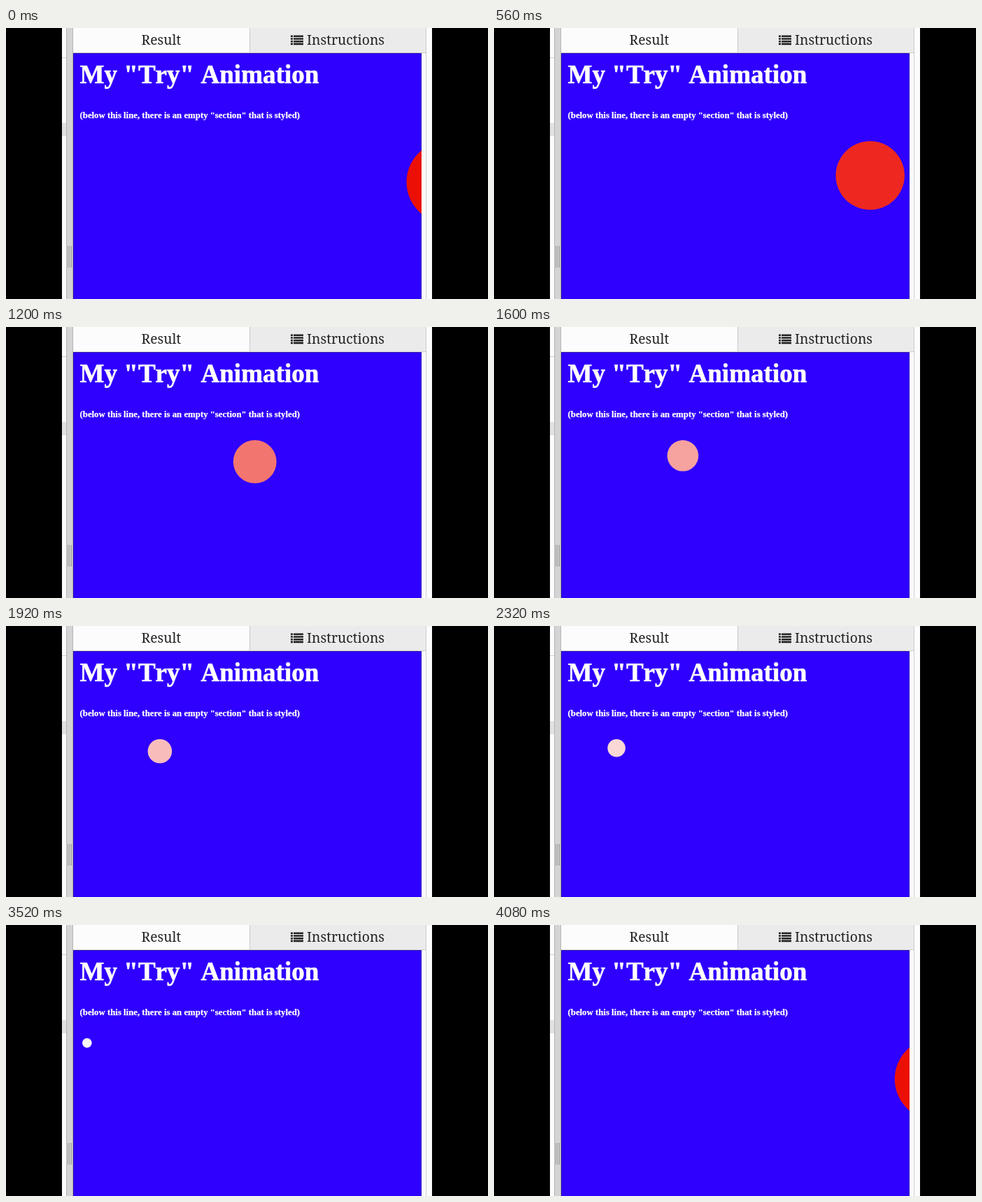
Write an HTML page that moves like this. It is 689x388 px and loops after 4120 ms.

```html
<!DOCTYPE html>
<html lang="en">
<head>
<meta charset="utf-8">
<title>Try animation</title>
<style>
  html, body { margin: 0; width: 100%; height: 100%; overflow: hidden; background: #000; }
  svg { display: block; width: 689px; height: 388px; }
  text { font-kerning: none; }
  .tab { font: 19.3px "Noto Serif", serif; fill: #222; }
  .page {
    font-family: "Liberation Serif", "Times New Roman", serif;
    font-weight: bold; fill: #fff; stroke: #fff;
  }
</style>
</head>
<body>
<svg viewBox="0 0 689 388">
  <defs>
    <clipPath id="view"><rect x="97" y="37" width="497" height="351"/></clipPath>
  </defs>

  <!-- window chrome -->
  <rect x="80" width="529" height="388" fill="#fcfcfc"/>
  <rect x="80" y="42" width="6" height="1" fill="#ccc"/>
  <rect x="80" y="136" width="6" height="19" fill="#e2e2e2"/>
  <rect x="86" width="10" height="388" fill="#d4d4d4"/>
  <path d="M86.5 0V388M95.5 0V388" stroke="#b4b4b4"/>
  <path d="M88.5 312V343M91 312V343M93.5 312V343" stroke="#999"/>

  <!-- tabs -->
  <rect x="348" width="252" height="35" fill="#ebebeb"/>
  <path d="M348.5 0V35M600.5 0V388M96 35.5H600" stroke="#ccc"/>
  <path d="M407 11.8h3m1 0h14M407 15.5h3m1 0h14M407 19.2h3m1 0h14M407 22.9h3m1 0h14" stroke="#222" stroke-width="2.6"/>
  <text class="tab" x="193.5" y="24">Result</text>
  <text class="tab" x="430" y="24">Instructions</text>

  <!-- page -->
  <rect x="96.5" y="36.5" width="497" height="360" fill="#2f00fe" stroke="#2404b8"/>
  <text class="page" x="105.5" y="79" font-size="37.1" stroke-width=".6">My "Try" Animation</text>
  <text class="page" x="105.5" y="129" font-size="12.8" stroke-width=".25">(below this line, there is an empty "section" that is styled)</text>
  <g clip-path="url(#view)"><circle id="ball"/></g>
</svg>
<script>
  const LOOP = 4120, STEP = 40, DURATION = 3970, LEAD = 30, RESTART = 4055;
  const ball = document.getElementById("ball");
  const mix = (a, b, p) => a + (b - a) * p;
  const bezier = (a, b, s) => 3 * (1 - s) ** 2 * s * a + 3 * (1 - s) * s * s * b + s ** 3;

  // cubic-bezier(.25, .1, .25, 1), solved by bisection
  function ease(x) {
    let lo = 0, hi = 1;
    for (let i = 0; i < 30; i++) {
      const mid = (lo + hi) / 2;
      if (bezier(.25, .25, mid) < x) lo = mid; else hi = mid;
    }
    return bezier(.1, 1, lo);
  }

  function draw(now) {
    const t = Math.floor(now % LOOP / STEP) * STEP;
    const elapsed = t < RESTART ? Math.min(t + LEAD, DURATION) : t - RESTART;
    const p = ease(elapsed / DURATION);
    const r = mix(117.4, 13, p) / 2;
    const tint = p ** 1.33;
    ball.setAttribute("cx", mix(574, 106, p) + r);
    ball.setAttribute("cy", 162 + r);
    ball.setAttribute("r", r);
    ball.setAttribute("fill", `rgb(${mix(236, 252, tint)},${mix(15, 252, tint)},${mix(6, 252, tint)})`);
  }

  const start = performance.now();
  function tick() {
    draw(performance.now() - start);
    requestAnimationFrame(tick);
  }
  tick();
</script>
</body>
</html>
```
